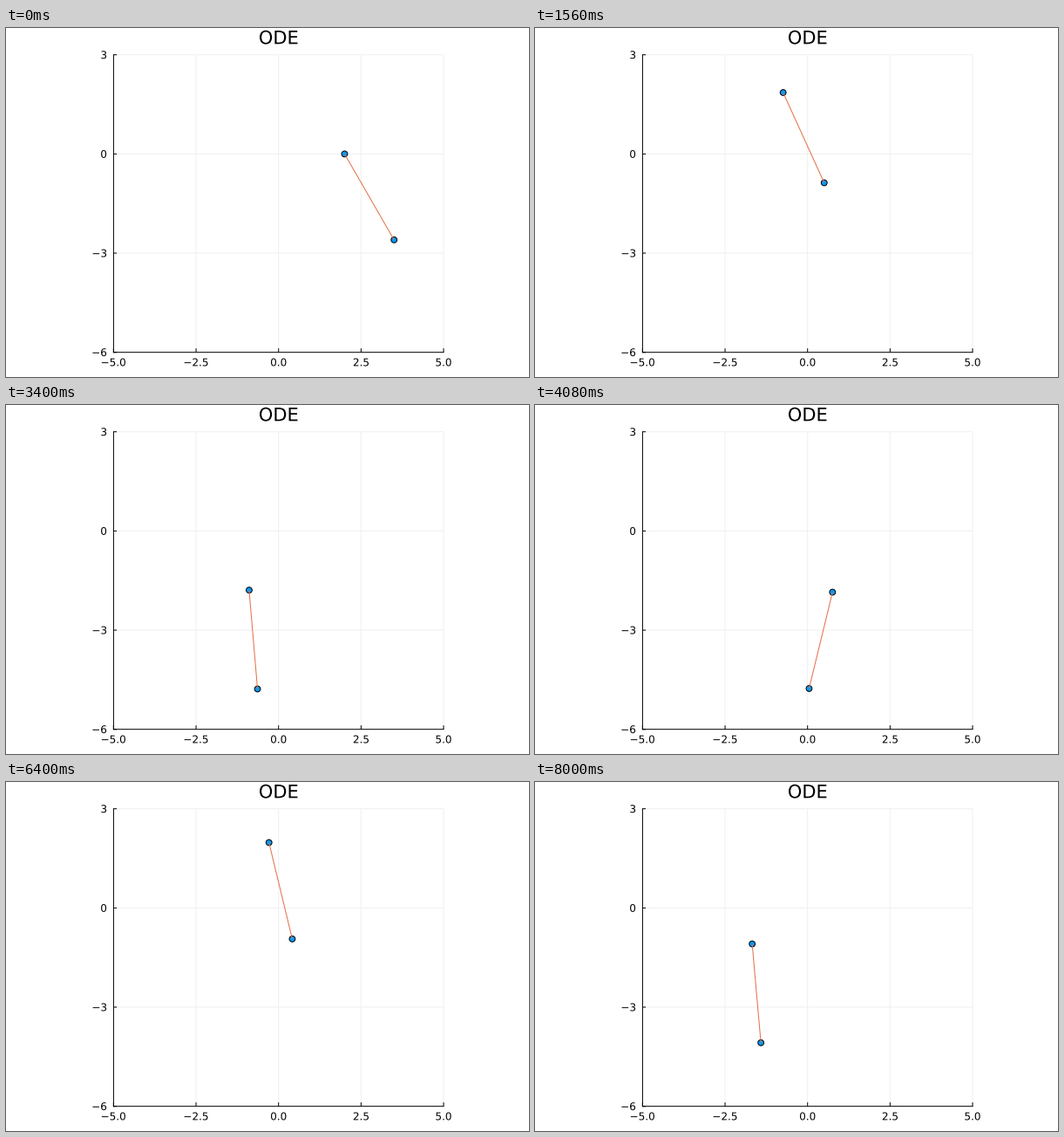
These frames come from a looping animation (600 px wide and 400 px high, 8.04 s). A matplotlib script:

```python
import numpy as np
import matplotlib.pyplot as plt
from matplotlib.animation import FuncAnimation
from matplotlib.patches import Circle, PathPatch
from matplotlib.path import Path
from matplotlib.textpath import TextPath

FRAMES, INTERVAL = 201, 40
DT = 0.05                       # model seconds per frame
R, L, G = 2.0, 3.0, 32.0        # pivot circle, rod length, gravity
THETA0 = np.pi / 6
PX = 0.72                       # points per pixel at 100 dpi

LEFT, RIGHT, TOP, BOTTOM = 123.4, 502.0, 30.7, 371.7

plt.rcParams["font.family"] = "DejaVu Sans"
fig = plt.figure(figsize=(6, 4), dpi=100, facecolor="white")
ax = fig.add_axes([0, 0, 1, 1])
ax.set(xlim=(0, 600), ylim=(400, 0))
ax.axis("off")


def sx(x):
    return LEFT + (x + 5) * (RIGHT - LEFT) / 10


def sy(y):
    return TOP + (3 - y) * (BOTTOM - TOP) / 9


def line(x0, y0, x1, y1, color="black", z=2):
    ax.plot([x0, x1], [y0, y1], color=color, lw=PX, zorder=z,
            solid_capstyle="butt", snap=False)


def label(x, y, text, size, align=0.5):
    """Text as outlines, so that it sits at fractions of a pixel."""
    glyphs = TextPath((0, 0), text.replace("-", "\u2212"), size=size)
    box = glyphs.get_extents()
    x -= box.x0 + align * box.width
    ax.add_patch(PathPatch(Path(glyphs.vertices * [1, -1] + [x, y],
                                glyphs.codes), fc="black", lw=0, snap=False))


# Grid, ticks and labels
for v in np.linspace(-5, 5, 5):
    x = sx(v)
    line(x, TOP, x, BOTTOM, "#f0f0f0", 1)
    line(x, BOTTOM, x, BOTTOM - 4.5)
    label(x, 387.4, f"{v:.1f}", 12)
for v in (-6, -3, 0, 3):
    y = sy(v)
    line(LEFT, y, RIGHT, y, "#f0f0f0", 1)
    line(LEFT, y, LEFT + 3.7, y)
    label(115.1, y + 4.4, str(v), 12, 1)
line(LEFT, TOP - 0.5, LEFT, BOTTOM + 0.5)
line(LEFT - 0.5, BOTTOM, RIGHT + 0.5, BOTTOM)
label(sx(0), 18.3, "ODE", 21)

dots = [ax.add_patch(Circle((0, 0), 3.4, fc="#009afa", ec="black",
                            lw=PX, zorder=3)) for _ in range(2)]
rod, = ax.plot([], [], color="#e26f46", lw=PX, zorder=4, snap=False,
               solid_capstyle="butt")


def theta(t):
    """Linearised pendulum driven by its circling pivot, released at rest."""
    w2 = G / L
    drive = (R / L) / (w2 - 1)
    return drive * np.cos(t) + (THETA0 - drive) * np.cos(np.sqrt(w2) * t)


def update(i):
    t = i * DT
    px, py = R * np.cos(t), R * np.sin(t)
    a = theta(t)
    xs = sx(np.array([px, px + L * np.sin(a)]))
    ys = sy(np.array([py, py - L * np.cos(a)]))
    rod.set_data(xs, ys)
    for dot, x, y in zip(dots, xs, ys):
        dot.center = (x, y)
    return [rod, *dots]


anim = FuncAnimation(fig, update, frames=FRAMES, interval=INTERVAL,
                     repeat=True, repeat_delay=0, blit=False)
plt.show()
```
